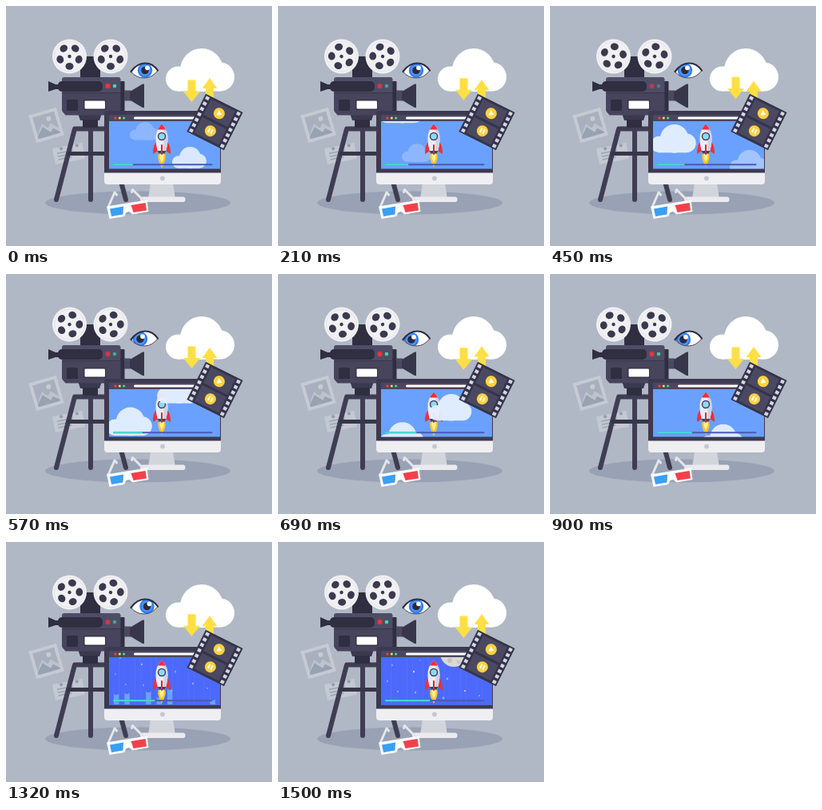
An HTML page for the animation above (1.53 s loop, 333x300 px).

```html
<!DOCTYPE html>
<html lang="en">
<head>
<meta charset="utf-8">
<title>Film making</title>
<style>
html, body { margin: 0; width: 100%; height: 100%; overflow: hidden; background: #b0b8c6; }
svg { display: block; width: 100vw; height: 100vh; }
</style>
</head>
<body>
<svg viewBox="0 0 333 300">
<defs>
  <g id="cloud">
    <circle cx="15.5" cy="38" r="15.5"/><circle cx="45" cy="27" r="27"/><circle cx="68" cy="35.5" r="18"/>
    <rect x="15" y="36" width="53" height="17.5"/>
  </g>
  <g id="reel">
    <circle r="21.5" fill="#f1f1f4"/>
    <circle r="18.8" fill="none" stroke="#e2e2e8" stroke-width=".8"/>
    <circle r="2.2" fill="#3b394e"/>
  </g>
  <clipPath id="screenClip"><rect x="129" y="144" width="139" height="59.5"/></clipPath>
  <clipPath id="eyeClip"><path d="M156.500 82Q164 71 174 71Q184 71 190 80.500Q183 90 173 90Q163 90 156.500 82Z"/></clipPath>
  <clipPath id="rocketClip"><path d="M195 147.500Q203 156 202.500 167Q202 177 199 184.500H191Q188 177 187.500 167Q187 156 195 147.500Z"/></clipPath>
</defs>

<rect width="333" height="300" fill="#b0b8c6"/>
<ellipse cx="165" cy="246" rx="116" ry="14.500" fill="#99a2b4"/>

<!-- photo and note -->
<g transform="translate(50.500 149) rotate(-16)">
  <rect x="-18" y="-18" width="36" height="36" fill="#c5cad3"/>
  <rect x="-14" y="-14" width="28" height="28" fill="#a8b0bf"/>
  <path d="M-14 9L-5 -3L1 4L6 -1L14 8V14H-14Z" fill="#bec4ce"/>
  <path d="M-14 10L-5 1L3 10L7 6L14 12V14H-14Z" fill="#98a2b3"/>
  <circle cx="5" cy="-7" r="3" fill="#c5cad3"/>
</g>
<g transform="translate(78.500 184.500) rotate(-11)">
  <rect x="-19" y="-10" width="38" height="20" fill="#c3c8d1"/>
  <path d="M-14 -3H6M-14 1H13M-14 5H3" stroke="#9ba4b4" stroke-width="1.500"/>
  <circle cx="-8" cy="-8" r="2" fill="#929bad"/>
  <circle cx="12" cy="-8" r="2" fill="#929bad"/>
</g>

<!-- tripod -->
<g fill="none" stroke="#403d53" stroke-width="6" stroke-linecap="round" stroke-linejoin="round">
  <path d="M63 242L86 153.500H126L150 242M106 153V242"/>
  <path d="M79 184.500H134" stroke="#38354a" stroke-width="5"/>
</g>

<!-- camera -->
<path d="M93 63H118V90H93Z" fill="#302e41"/>
<path d="M90 134H120L117 143H93Z" fill="#3b394e"/>
<rect x="96" y="142" width="19" height="10" fill="#302e41"/>
<rect x="142" y="94" width="6.500" height="38" rx="1" fill="#302e41"/>
<rect x="148" y="105.500" width="8" height="13" fill="#4b4861"/>
<path d="M155 107L171 97.500H173V127H171L155 117.500Z" fill="#38364a"/>
<path d="M53 94L62 98H68V104H62L53 107Z" fill="#302e41"/>
<rect x="70" y="89" width="73.500" height="20" rx="3" fill="#4f4c66"/>
<path d="M70 108H143.500V131L139 136.500H74.500L70 131Z" fill="#47445c"/>
<path d="M70 108.500H143" stroke="#393649" stroke-width="1"/>
<rect x="65" y="94" width="56" height="13" rx="5" fill="#302e41"/>
<rect x="76" y="117" width="14" height="14" rx="1.500" fill="#302e41"/>
<rect x="97" y="117" width="28" height="13" rx="2" fill="#35334a"/>
<rect x="98.500" y="118.500" width="25.500" height="10" rx="1" fill="#fff"/>
<circle id="red" cx="127.500" cy="100" r="3.100" fill="#f3343c"/>
<circle id="green" cx="136" cy="100" r="2.300" fill="#43dfab"/>
<g transform="translate(79.500 63)"><g class="reel"><use href="#reel"/></g></g>
<g transform="translate(131 63)"><g class="reel"><use href="#reel"/></g></g>

<!-- eye -->
<g clip-path="url(#eyeClip)">
  <rect x="154" y="68" width="38" height="24" fill="#fff"/>
  <g id="iris">
    <circle r="9.200" fill="#2f7cf6"/><circle r="7" fill="#4b96ff"/>
    <circle r="4.800" fill="#2c2a3d"/><circle cx="3" cy="-3.200" r="2.900" fill="#fff"/>
  </g>
</g>
<path d="M156.500 82Q163 90 173 90Q183 90 190 80.500" fill="none" stroke="#48465c" stroke-width="1"/>
<path d="M156.500 82Q164 71.500 174 71.500Q184 71.500 190 80.500" fill="none" stroke="#302e41" stroke-width="2.200" stroke-linecap="round"/>

<!-- upload cloud -->
<use href="#cloud" x="200" y="53" fill="#fff"/>
<g fill="#ffdf45">
  <path id="down" d="M227.500 91.500H237.500V106H243L232.500 119L222 106H227.500Z"/>
  <path id="up" d="M255 90.500L264.500 103.500H260V118H250V103.500H245.500Z"/>
</g>

<!-- monitor -->
<path d="M181 222H209L212 241H178Z" fill="#d3d5dd"/>
<rect x="168" y="238.500" width="56.500" height="6.500" rx="3" fill="#ebebef"/>
<path d="M127 131H265Q269 131 269 135V209H123V135Q123 131 127 131Z" fill="#3c3a50"/>
<path d="M123 208.500H269V219Q269 223 265 223H127Q123 223 123 219Z" fill="#efeff2"/>
<circle cx="196" cy="215.500" r="2.900" fill="#c6c8d1"/>
<rect x="129" y="136" width="139" height="8.500" fill="#4a4760"/>
<circle cx="137" cy="140" r="1.600" fill="#f6474c"/>
<circle cx="142.300" cy="140" r="1.600" fill="#ffd83f"/>
<circle cx="147.600" cy="140" r="1.600" fill="#42d9a9"/>
<rect x="160" y="138.500" width="92" height="3" rx="1.500" fill="#fff"/>
<g clip-path="url(#screenClip)">
  <rect x="129" y="144" width="139" height="60" fill="#6aa1ff"/>
  <g id="back"></g>
  <g id="rain" fill="#4c69fb"></g>
  <g id="space">
    <g id="stars" fill="#fff"></g>
    <g id="moon"><circle r="17" fill="#dbd8d4"/><circle cx="-5" cy="9" r="3" fill="#c6c2c1"/><circle cx="6" cy="11" r="2" fill="#c6c2c1"/></g>
  </g>
  <g id="flame">
    <path d="M190.500 185H199.500Q201 192 195 202.500Q189 192 190.500 185Z" fill="#ffc52f"/>
    <path d="M192.500 185H197.500Q198.500 190 195 196Q191.500 190 192.500 185Z" fill="#fff08a"/>
  </g>
  <path d="M188.500 170Q184 173 184 185L190.500 181ZM201.500 170Q206 173 206 185L199.500 181Z" fill="#ee2f3c"/>
  <g clip-path="url(#rocketClip)">
    <rect x="186" y="146" width="18" height="40" fill="#e9edf5"/>
    <rect x="197.500" y="146" width="7" height="40" fill="#cdd4e2"/>
    <rect x="186" y="146" width="18" height="8.500" fill="#ee2f3c"/>
    <rect x="186" y="181" width="18" height="4" fill="#47445c"/>
  </g>
  <circle cx="195" cy="163" r="4.500" fill="#8fd9f4" stroke="#45425a" stroke-width="1.500"/>
  <rect x="194" y="173" width="2" height="13" rx="1" fill="#d82734"/>
  <g id="front"></g>
  <rect x="134" y="197.200" width="124.500" height="2" rx="1" fill="#4b59b4"/>
  <rect id="bar" x="134" y="197.200" height="2" rx="1" fill="#45e3d5"/>
</g>

<!-- film strip -->
<g transform="translate(261.500 145) rotate(26.500)">
  <rect x="-26" y="-26.500" width="52" height="53" fill="#35334a"/>
  <rect x="-17" y="-23.500" width="34" height="22" fill="#4b4861"/>
  <rect x="-17" y="1.500" width="34" height="22" fill="#4b4861"/>
  <path d="M-21.700 -24.500V26M21.700 -24.500V26" stroke="#d3d7e0" stroke-width="4.600" stroke-dasharray="4.200 3.300"/>
  <circle cy="-12" r="7" fill="#ffd23f"/><circle cy="12.500" r="7" fill="#ffd23f"/>
  <path d="M-2 -15.500L3.800 -12L-2 -8.500Z" fill="#fff"/>
  <path d="M-1.900 9.500V15.500M1.900 9.500V15.500" stroke="#fff" stroke-width="2"/>
</g>

<!-- 3D glasses -->
<g fill="none" stroke="#e4e6ec" stroke-width="3" stroke-linejoin="round" stroke-linecap="round">
  <path d="M128.500 250L136 233L138.500 236"/><path d="M174 245L158.500 229.500L157.500 232.500"/>
</g>
<path d="M126 250.500L176.500 242.500L178.500 257L158.500 260.500L154 257L150.500 258L148 263L129.500 266Z" fill="#fff"/>
<path d="M130 253.500L147 250.500L146.500 260.500L132 263Z" fill="#39a0f5"/>
<path d="M156.500 249L174.500 246L176 255.500L159.500 258Z" fill="#f3404b"/>
</svg>

<script>
const LOOP = 1530, STEP = 30;
const $ = id => document.getElementById(id);
const clamp = (v, a, b) => Math.min(b, Math.max(a, v));
const put = (el, attrs) => { for (const k in attrs) el.setAttribute(k, attrs[k]); };
const add = (parent, tag, attrs) => {
  const el = document.createElementNS('http://www.w3.org/2000/svg', tag);
  put(el, attrs);
  return parent.appendChild(el);
};
const move = (el, x, y, s = 1) => put(el, { transform: `translate(${x} ${y}) scale(${s})` });

// Smooth value between [time, value] stops.
const tween = (stops, t) => {
  const i = clamp(stops.findIndex(s => s[0] > t), 1, stops.length - 1);
  const [t0, a] = stops[i - 1], [t1, b] = stops[i];
  const p = clamp((t - t0) / (t1 - t0), 0, 1);
  return a + (b - a) * p * p * (3 - 2 * p);
};

const reels = [...document.querySelectorAll('.reel')];
for (const reel of reels)
  for (let i = 0; i < 5; i++)
    add(reel, 'ellipse', { cx: 0, cy: 12.3, rx: 5, ry: 4.4, fill: '#3b394e', transform: `rotate(${i * 72})` });

// left, top at time, time, speed in px/ms, scale, opacity, layer
const clouds = [
  [155, 145, 0, .13, .42, .28, 'back'],
  [208, 176, 0, .16, .5, .9, 'back'],
  [126, 148, 450, .155, .66, .95, 'back'],
  [225, 180, 450, .3, .55, .45, 'back'],
  [189, 150, 690, .18, .62, .95, 'front']
].map(([x, y, at, v, s, opacity, layer]) =>
  ({ x, y, at, v, s, el: add($(layer), 'use', { href: '#cloud', fill: '#e6f0ff', opacity }) }));

// Night falls in columns; the gaps between them close later.
const drops = [18, 17, 40, 15, 22, 12, 31, 41, 33, 25, 20].flatMap((len, i) =>
  [len, len - 34].map((start, odd) => ({
    start,
    el: add($('rain'), 'rect', { x: 128 + 13.4 * i + 6.7 * odd, y: 134, width: 6.9, rx: 3.3 })
  })));

const stars = [[143, 154, 1], [170, 162, 1.4], [150, 187, 1], [178, 148, .8], [207, 195, 2],
  [234, 186, 1.3], [212, 171, 2], [172, 188, 1.8], [252, 192, 1], [137, 174, 1.6]];
for (const [x, y, r] of stars)
  add($('stars'), 'path', {
    d: `M${x} ${y - r}L${x + r * .7} ${y}L${x} ${y + r}L${x - r * .7} ${y}Z`,
    fill: r > 1.5 ? '#78bfff' : '#fff'
  });

const gazeX = [[0, 174], [210, 173], [450, 169], [690, 167], [900, 167], [1140, 173], [1500, 180]];
const gazeY = [[0, 80.5], [450, 80.5], [690, 82], [900, 82], [1140, 80.5]];

function draw(t) {
  const wave = Math.cos(t / LOOP * 4 * Math.PI);
  for (const reel of reels) put(reel, { transform: `rotate(${144 * t / LOOP})` });
  move($('iris'), tween(gazeX, t), tween(gazeY, t));
  move($('down'), 0, 2 * wave - 1);
  move($('up'), 0, 1.5 - 2 * wave);
  put($('red'), { opacity: .8 + .2 * wave });
  put($('green'), { opacity: .65 + .35 * wave });
  for (const c of clouds) move(c.el, c.x, c.y + (t - c.at) * c.v, c.s);
  for (const d of drops) {
    const len = d.start + (t - 1140) * .35;
    put(d.el, { height: len > 0 ? Math.min(len + 10, 80) : 0 });
  }
  put($('space'), { opacity: clamp((t - 1230) / 120, 0, 1) });
  move($('stars'), 0, (t - 1500) * .05);
  move($('moon'), 220, 139 + (t - 1500) * .15);
  put($('flame'), { transform: `translate(0 185) scale(1 ${.94 + .06 * Math.cos(t / LOOP * 18 * Math.PI)}) translate(0 -185)` });
  put($('bar'), { width: 25 + 32 * t / LOOP });
}

const begin = performance.now();
function tick() {
  const t = (performance.now() - begin) % LOOP;
  draw(Math.floor(t / STEP) * STEP);
  requestAnimationFrame(tick);
}
tick();
</script>
</body>
</html>
```
